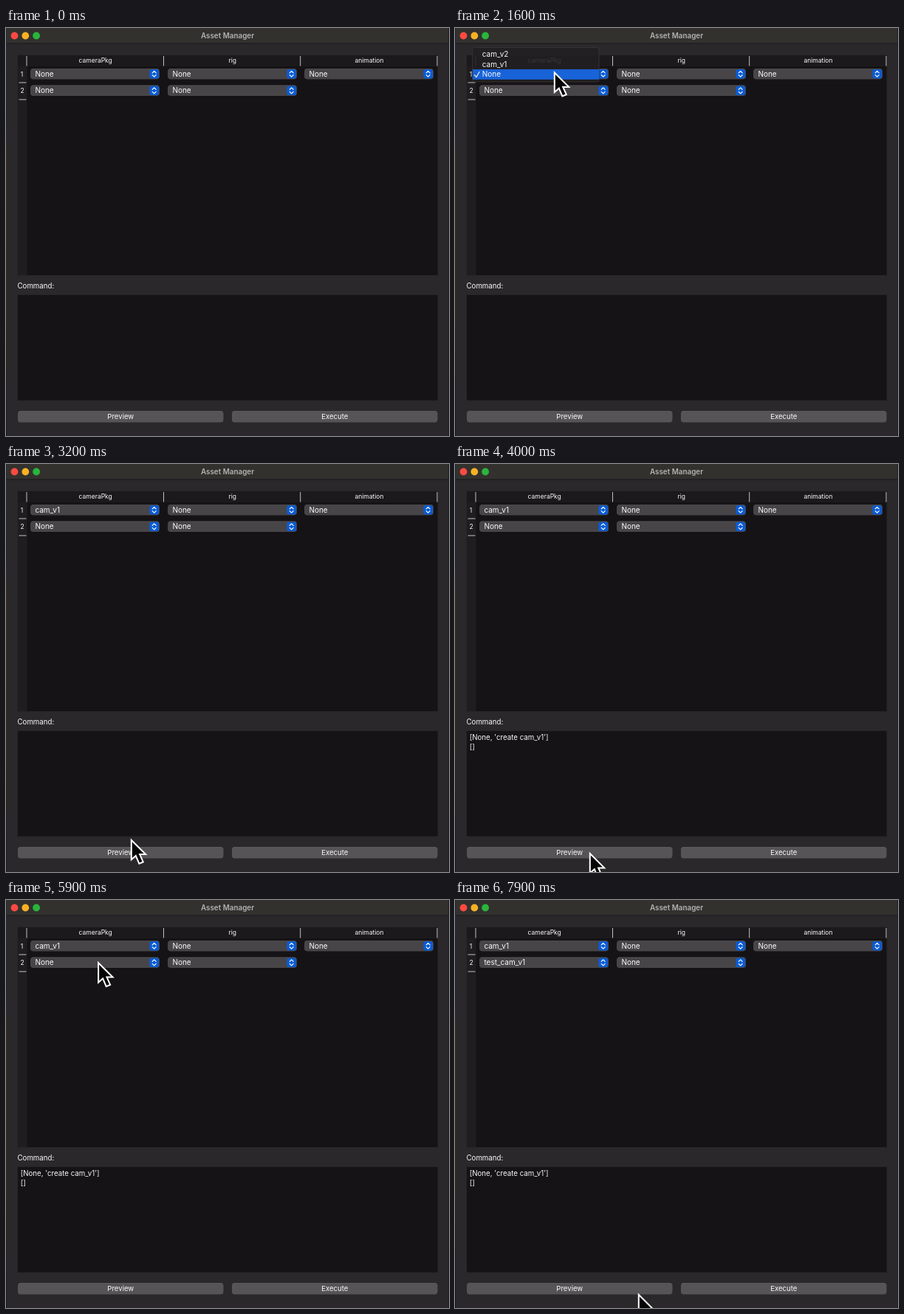
Write an HTML page that moves like this. It is 600 px wide and 553 px high and loops after 8 s.

```html
<!DOCTYPE html>
<html lang="en">
<head>
<meta charset="utf-8">
<title>Asset Manager</title>
<style>
  html, body { margin: 0; width: 100%; height: 100%; overflow: hidden; background: #2a282a; }
  svg { display: block; width: 100vw; height: 100vh; }
  text { font-family: Inter, Roboto, sans-serif; fill: #fafafa; white-space: pre; }
</style>
</head>
<body>
<svg id="stage" viewBox="0 0 600 553" preserveAspectRatio="none">
  <defs>
    <linearGradient id="edge" x2="0" y2="1">
      <stop offset="0" stop-color="#1c2b40"/>
      <stop offset=".22" stop-color="#17253c"/>
      <stop offset=".32" stop-color="#3a2c18"/>
      <stop offset=".7" stop-color="#2d2a18"/>
      <stop offset="1" stop-color="#171618"/>
    </linearGradient>
  </defs>
</svg>
<script>
const LOOP = 8000, STEP = 100;
const stage = document.getElementById('stage');

function add(parent, tag, attrs, content) {
  const el = document.createElementNS('http://www.w3.org/2000/svg', tag);
  for (const k in attrs) el.setAttribute(k, attrs[k]);
  if (content) el.textContent = content;
  parent.appendChild(el);
  return el;
}
const rect = (p, x, y, width, height, fill, more) =>
  add(p, 'rect', { x, y, width, height, fill, ...more });
const label = (p, x, y, size, str, more) =>
  add(p, 'text', { x, y, 'font-size': size, ...more }, str);
const middle = { 'text-anchor': 'middle' };

function combo(x, y, str) {
  rect(stage, x, y, 175, 14.4, '#474547', { rx: 3.8 });
  rect(stage, x + 2, y + .2, 171, .6, '#555355', { rx: .3 });
  const text = label(stage, x + 6.4, y + 10.8, 10, str);
  rect(stage, x + 161.3, y + .9, 12.8, 12.6, '#0b5bd3', { rx: 3.2 });
  add(stage, 'path', {
    d: `M${x + 165.2} ${y + 5.8}l2.5-2.5 2.5 2.5m-5 2.9l2.5 2.5 2.5-2.5`,
    fill: 'none', stroke: '#fff', 'stroke-width': 1.2,
    'stroke-linecap': 'round', 'stroke-linejoin': 'round'
  });
  return text;
}

function button(x, w, str) {
  rect(stage, x, 519, w, 15.4, '#565456', { rx: 3.6 });
  rect(stage, x + 2, 519.2, w - 4, .6, '#636163');
  label(stage, x + w / 2, 530, 9.6, str, middle);
}

// Window
rect(stage, 0, 0, 600, 553, '#2a282a');
rect(stage, 0, 0, 600, 20.5, '#33312e');
rect(stage, 0, 20.5, 600, 1, '#1b191b');
rect(stage, 0, 0, 1, 553, 'url(#edge)');
rect(stage, 599, 0, 1, 553, '#1e1c1e');
['#fc4a43', '#f8b124', '#29b53b'].forEach((fill, i) =>
  add(stage, 'circle', { cx: 11.5 + i * 14.8, cy: 10.5, r: 4.9, fill }));
label(stage, 300, 13.8, 9.9, 'Asset Manager', { ...middle, 'font-weight': 600, style: 'fill:#b5b3b1' });

// Table
rect(stage, 15.5, 36.5, 569.5, 299, '#151315', { stroke: '#272527', 'stroke-width': 1 });
rect(stage, 16, 37, 569, 15, '#1b191b');
rect(stage, 16, 52, 12.5, 283, '#1f1d1f');
[28, 213.5, 398.7, 584].forEach(x => rect(stage, x - .5, 38, 1, 13.5, '#c4c3c4'));
[74, 97].forEach(y => rect(stage, 17.5, y - .5, 10, 1, '#c4c3c4'));
[['cameraPkg', 121.2], ['rig', 306.7], ['animation', 491.9]].forEach(([s, x]) =>
  label(stage, x, 47, 8.5, s, middle));
label(stage, 21.6, 66, 8.5, '1', middle);
label(stage, 22, 88.3, 8.5, '2', middle);

const first = combo(33, 55, 'None');
combo(219, 55, 'None');
combo(404, 55, 'None');
const second = combo(33, 77.6, 'None');
combo(219, 77.6, 'None');

// Command area and buttons
label(stage, 15.5, 353, 9.7, 'Command:');
rect(stage, 15.5, 361.5, 569.5, 143.5, '#151315', { stroke: '#272527', 'stroke-width': 1 });
const output = add(stage, 'g', {});
label(output, 19.7, 374.4, 9.7, "[None, 'create cam_v1']");
label(output, 19.7, 386.6, 9.7, '[]');
button(16, 278.5, 'Preview');
button(306, 278.5, 'Execute');

function makeMenu(top, items, open, close) {
  const rowH = 13.5, g = add(stage, 'g', {});
  const n = items.length, h = n * rowH + 6;
  rect(g, 23.5, top + .5, 171.5, h, '#222022', {
    rx: 2.5, 'fill-opacity': .9, stroke: '#383638', 'stroke-width': .8
  });
  const bar = rect(g, 24, top, 171, 13.8, '#1863d8');
  items.forEach((s, i) => label(g, 36.8, top + 13.2 + i * rowH, 10, s));
  const tick = i => add(g, 'path', {
    d: `M26.5 ${top + 10.6 + i * rowH}l2.5 3 4-7`,
    fill: 'none', stroke: '#fafafa', 'stroke-width': 1.1,
    'stroke-linecap': 'round', 'stroke-linejoin': 'round'
  });
  tick(n - 1);
  const chosen = tick(n - 2);
  return (t, y) => {
    const on = t >= open && t < close + 250;
    g.setAttribute('display', on ? 'inline' : 'none');
    if (!on) return;
    const done = t >= close;
    const row = done ? n - 2 : Math.max(0, Math.min(n - 1, Math.floor((y - top - 3) / rowH)));
    bar.setAttribute('y', top + 3 + row * rowH);
    chosen.setAttribute('display', done ? 'inline' : 'none');
    g.setAttribute('opacity', done ? .87 * (1 - (t - close) / 250) : 1);
  };
}
const menus = [
  makeMenu(26, ['cam_v2', 'cam_v1', 'None'], 1500, 2400),
  makeMenu(35.2, ['test_cam_v3', 'test_cam_v2', 'test_cam_v1', 'None'], 6100, 6600)
];

const pointer = add(stage, 'path', {
  d: 'M.8 0V26.5L6.8 21.2 11.4 32 16.8 29.7 12.2 19.4H20.2Z',
  fill: '#050505', stroke: '#fff', 'stroke-width': 2, 'stroke-linejoin': 'miter'
});

// Pointer stops: time, x, y
const path = [
  [0, -24, 395], [100, -12, 380], [800, 169, 68], [900, 170, 65],
  [1400, 150, 63], [1800, 118, 58], [2200, 106, 46], [2400, 106, 46],
  [2800, 145, 476], [2900, 145, 476], [3400, 182, 528], [4900, 182, 528],
  [5200, 133, 152], [5800, 126, 86], [6300, 110, 78], [6600, 110, 78],
  [7100, 212, 508], [7200, 212, 508], [7900, 248, 535], [8000, 248, 535]
];

function pointerAt(t) {
  const i = path.findIndex(p => p[0] > t);
  const [t0, x0, y0] = path[i - 1], [t1, x1, y1] = path[i];
  const u = (t - t0) / (t1 - t0), e = u * u * (3 - 2 * u);
  return [x0 + (x1 - x0) * e, y0 + (y1 - y0) * e];
}

function render(ms) {
  const t = Math.floor((ms % LOOP) / STEP) * STEP;
  const [x, y] = pointerAt(t);
  pointer.setAttribute('transform', `translate(${x} ${y})`);
  first.textContent = t >= 2400 ? 'cam_v1' : 'None';
  second.textContent = t >= 6600 ? 'test_cam_v1' : 'None';
  output.setAttribute('display', t >= 3700 ? 'inline' : 'none');
  menus.forEach(draw => draw(t, y));
}

const start = performance.now();
function tick() {
  render(Math.max(0, performance.now() - start));
  requestAnimationFrame(tick);
}
tick();
</script>
</body>
</html>
```
